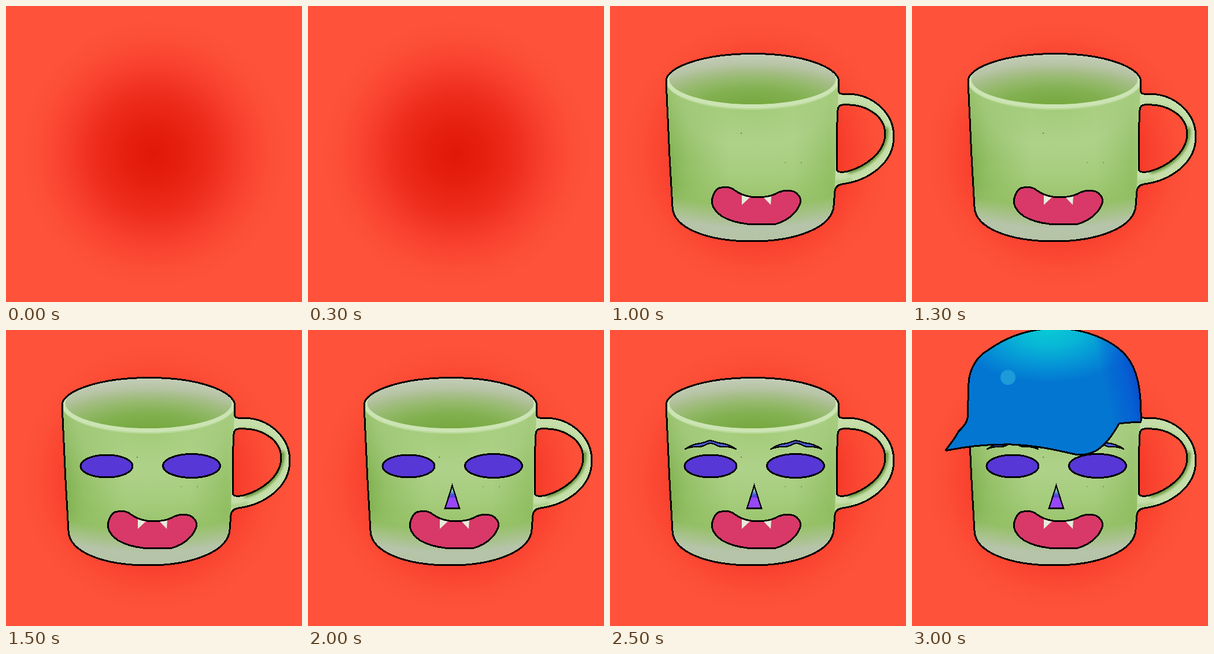
An HTML page that plays this animation: 512 px wide and 512 px high, repeating every 3500 ms.

```html
<!DOCTYPE html>
<html lang="en">
<head>
<meta charset="utf-8">
<title>Mug face</title>
<style>
  html, body { margin: 0; width: 100%; height: 100%; overflow: hidden; background: #fe523a; }
  svg { display: block; width: 100vw; height: 100vh; }
  .ink { stroke: #000; stroke-width: 3; stroke-linejoin: round; shape-rendering: crispEdges; }
  .thin { stroke-width: 2.3; }
  [data-step] { opacity: 0; }
</style>
</head>
<body>
<svg viewBox="0 0 512 512">
  <defs>
    <radialGradient id="glow" gradientUnits="userSpaceOnUse" cx="256" cy="256" r="232">
      <stop offset="0" stop-color="#df1807"/>
      <stop offset=".22" stop-color="#e6200f"/>
      <stop offset=".46" stop-color="#ef2e1e"/>
      <stop offset=".7" stop-color="#f94330"/>
      <stop offset=".88" stop-color="#fd4f37"/>
      <stop offset="1" stop-color="#fe523a"/>
    </radialGradient>
    <radialGradient id="body" gradientUnits="userSpaceOnUse" cx="0" cy="0" r="1" gradientTransform="translate(247 170) scale(422 238)">
      <stop offset="0" stop-color="#a2cb77"/>
      <stop offset=".3" stop-color="#afd28a"/>
      <stop offset=".54" stop-color="#a5cc7b"/>
      <stop offset=".74" stop-color="#97c269"/>
      <stop offset=".83" stop-color="#a7c28a"/>
      <stop offset=".9" stop-color="#b6c4aa"/>
      <stop offset="1" stop-color="#b5c3a5"/>
    </radialGradient>
    <linearGradient id="sides" gradientUnits="userSpaceOnUse" x1="98" y1="0" x2="396" y2="0">
      <stop offset="0" stop-color="#679d34" stop-opacity=".65"/>
      <stop offset=".12" stop-color="#78ad45" stop-opacity=".4"/>
      <stop offset=".36" stop-color="#82b652" stop-opacity="0"/>
      <stop offset=".74" stop-color="#82b652" stop-opacity="0"/>
      <stop offset=".95" stop-color="#78ad45" stop-opacity=".36"/>
      <stop offset="1" stop-color="#78ad45" stop-opacity=".2"/>
    </linearGradient>
    <linearGradient id="fade" gradientUnits="userSpaceOnUse" x1="0" y1="140" x2="0" y2="352">
      <stop offset="0" stop-color="#666"/>
      <stop offset=".6" stop-color="#fff"/>
      <stop offset=".8" stop-color="#ddd"/>
      <stop offset="1" stop-color="#000"/>
    </linearGradient>
    <mask id="fadeMask"><path d="M80 120H400V410H80Z" fill="url(#fade)"/></mask>
    <radialGradient id="inside" gradientUnits="userSpaceOnUse" cx="0" cy="0" r="1" gradientTransform="translate(248 185) scale(260 101)">
      <stop offset=".15" stop-color="#76a840"/>
      <stop offset=".4" stop-color="#82b050"/>
      <stop offset=".58" stop-color="#93b96a"/>
      <stop offset=".72" stop-color="#a6bd88"/>
      <stop offset=".83" stop-color="#b6c4a4"/>
      <stop offset="1" stop-color="#c3cdb8"/>
    </radialGradient>
    <linearGradient id="nose" gradientUnits="userSpaceOnUse" x1="0" y1="268" x2="0" y2="308">
      <stop offset=".18" stop-color="#a9cfa4"/>
      <stop offset=".32" stop-color="#59a7cf"/>
      <stop offset=".42" stop-color="#4b53d4"/>
      <stop offset=".52" stop-color="#5a40da"/>
      <stop offset=".58" stop-color="#9747f6"/>
    </linearGradient>
    <radialGradient id="cap" gradientUnits="userSpaceOnUse" cx="0" cy="0" r="1" gradientTransform="translate(235 -2) scale(165 93)">
      <stop offset="0" stop-color="#09cbd6"/>
      <stop offset=".35" stop-color="#08b5d6"/>
      <stop offset=".7" stop-color="#0592d6"/>
      <stop offset="1" stop-color="#0376d2"/>
    </radialGradient>
    <linearGradient id="capSide" gradientUnits="userSpaceOnUse" x1="335" y1="110" x2="398" y2="96">
      <stop offset="0" stop-color="#0848d0" stop-opacity="0"/>
      <stop offset=".6" stop-color="#0850d4" stop-opacity=".55"/>
      <stop offset="1" stop-color="#0a3fc8" stop-opacity=".9"/>
    </linearGradient>
    <filter id="soft" x="-30%" y="-30%" width="160%" height="160%"><feGaussianBlur stdDeviation="2.5"/></filter>

    <path id="mugShape" d="M97 130C97 106 160 82.500 248 82.500C336 82.500 396 107 396 131
      Q394 146 397 151Q402 153 412 152C455 153 491 185 491 226C491 272 447 302 402 308
      Q390 310 389 320L387 345C385 383 322 407 246 407C170 407 109 385 108 347L103 260Z
      M394 180Q395 171 402 171C441 168 476 189 476 222C475 254 441 278 411 286
      Q397 289 393 285Q391 230 394 180Z"/>
    <clipPath id="mugClip"><use href="#mugShape" clip-rule="evenodd"/></clipPath>
    <path id="front" d="M96 128L103 260L108 410H387L389 315Q391 230 394 172L396 128Z"/>
    <path id="capShape" d="M58 208Q76 185 80 176Q95 162 96 152L98 92C99 66 114 45 130 36
      C160 14 200 -2 247 -3C300 -3 347 18 370 44C389 66 397 100 396 159
      Q372 160 358 162C346 184 332 201 318 209Q302 218 282 215C246 207 217 200 172 198Q116 197 62 208Z"/>
    <path id="brow" class="ink thin" fill="#4a5cd2" d="M130 206Q142 197 157 196Q165 194 172 191
      Q180 192 187 195Q206 197 218 206Q208 202 200 202Q190 203 184 199Q173 193 165 199Q157 203 149 202Q139 202 130 206Z"/>
  </defs>

  <rect width="512" height="512" fill="url(#glow)"/>

  <g data-step="1">
    <g clip-path="url(#mugClip)">
      <path d="M85 75H500V415H85Z" fill="#c6dfaa"/>
      <g fill="none" filter="url(#soft)">
        <path d="M402 171C444 168 475 192 477 220" stroke="#9dc474" stroke-width="4"/>
        <path d="M478 210C481 250 446 278 412 287" stroke="#5f8f30" stroke-width="7"/>
        <path d="M388 304Q402 306 418 300" stroke="#a9cd84" stroke-width="6"/>
      </g>
      <use href="#front" fill="url(#body)"/>
      <use href="#front" fill="url(#sides)" mask="url(#fadeMask)"/>
      <ellipse cx="246.500" cy="130" rx="150" ry="49.500" fill="#b9d99a"/>
      <ellipse cx="246.500" cy="129" rx="150" ry="48" fill="#cce4b3"/>
      <ellipse cx="246.500" cy="126.500" rx="144" ry="43.500" fill="url(#inside)"/>
    </g>
    <use href="#mugShape" class="ink" fill="none"/>
    <g fill="#47642d">
      <circle cx="227" cy="220" r=".9"/>
      <circle cx="303" cy="271" r=".7"/>
      <circle cx="331" cy="271" r=".8"/>
    </g>
  </g>

  <g data-step="2">
    <path class="ink" fill="#d83968" d="M176 338C178 324 184 314 193 314Q206 311 216 319Q229 328 244 330H268
      Q280 329 292 322Q306 317 318 321Q329 326 330 338C325 357 308 371 287 377H237Q211 374 194 364Q177 352 176 338Z"/>
    <path fill="#e7ecd9" d="M228 327.500V344L242 331Q234 330 228 327.500ZM266 331.500L278 344L279 329.500Q272 331 266 331.500Z"/>
  </g>

  <g data-step="3" class="ink" fill="#5737d6">
    <ellipse cx="174" cy="235.500" rx="45" ry="19.500"/>
    <ellipse cx="321" cy="235" rx="49.500" ry="20.500"/>
  </g>

  <path data-step="4" class="ink thin" style="stroke-linejoin: miter" fill="url(#nose)" d="M249.500 269L262 308.500H237Z"/>

  <g data-step="5">
    <use href="#brow"/>
    <use href="#brow" x="148.500"/>
  </g>

  <g data-step="6">
    <use href="#capShape" fill="url(#cap)"/>
    <use href="#capShape" fill="url(#capSide)"/>
    <circle cx="166" cy="82" r="13" fill="#1c9bd8"/>
    <use href="#capShape" class="ink" fill="none"/>
  </g>
</svg>
<script>
  const STEP = 500, COUNT = 7;

  // Each layer pops in at its own step and stays until the loop restarts.
  for (const layer of document.querySelectorAll('[data-step]')) {
    layer.animate([
      { opacity: 0, offset: 0, easing: 'step-end' },
      { opacity: 1, offset: layer.dataset.step / COUNT },
      { opacity: 1, offset: 1 }
    ], { duration: STEP * COUNT, iterations: Infinity });
  }
</script>
</body>
</html>
```
